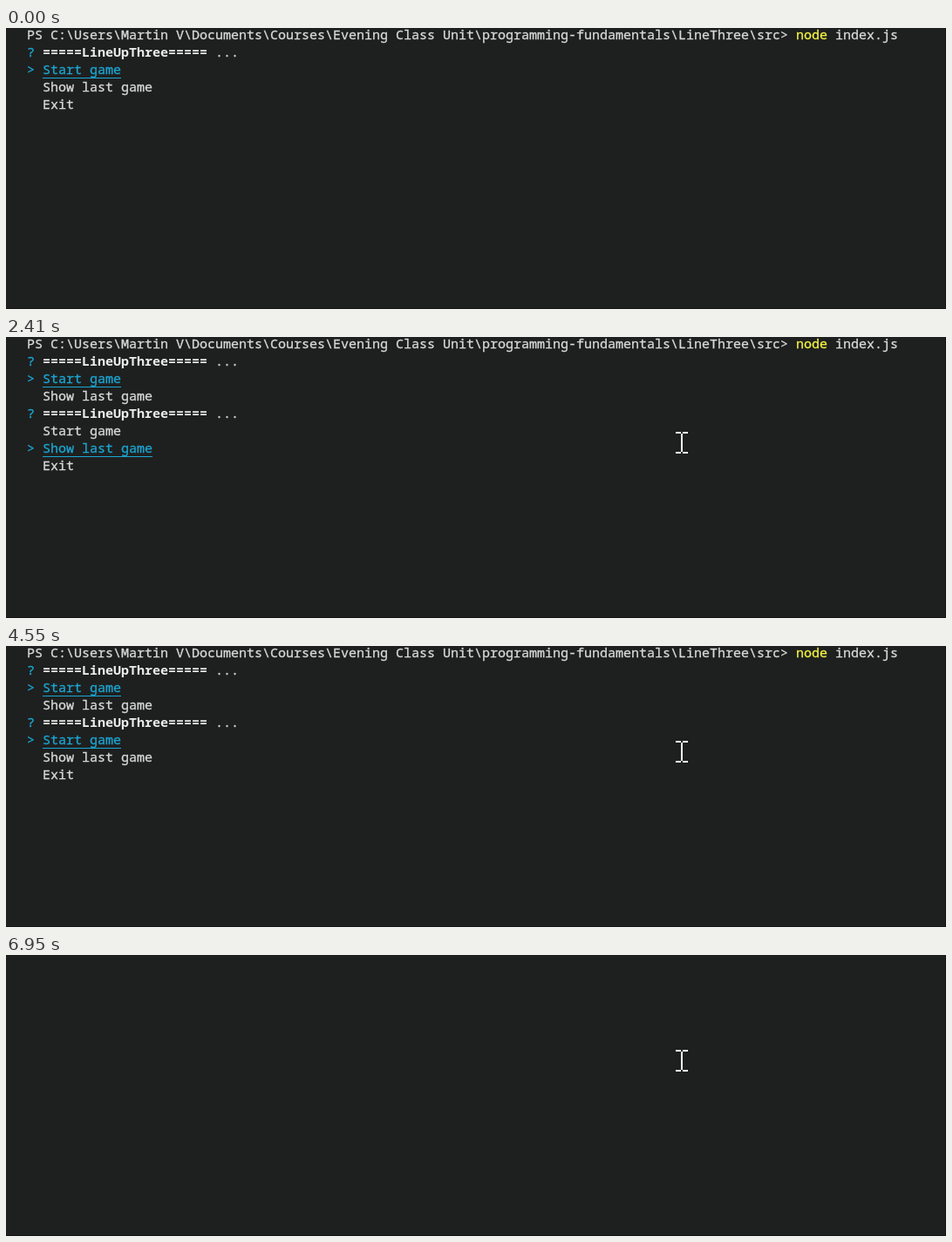
An HTML page for the animation above (8000 ms loop, 1078 by 323 pixels).

```html
<!DOCTYPE html>
<html lang="en">
<head>
<meta charset="utf-8">
<style>
html, body { margin: 0; width: 100%; height: 100%; overflow: hidden; background: #1e201f; }
#frame { position: absolute; inset: 0; border: solid #131413; border-width: 0 1px 1px 0; }
pre {
  position: absolute; left: 24px; top: -3px; margin: 0; color: #dadada;
  font: 15px/20px "Noto Sans Mono", "DejaVu Sans Mono", monospace;
  -webkit-text-stroke: .3px;
}
b { color: #ececec; -webkit-text-stroke: 0; }
i { font-style: normal; color: #f5f543; }
s, u { text-decoration: none; color: #1ca6d4; }
u { box-shadow: 0 1px #1ca6d4; }
svg { position: absolute; left: 0; top: 0; }
</style>
</head>
<body>
<div id="frame"></div>
<pre id="screen"></pre>
<svg width="1078" height="323">
  <circle id="click" cx="772" cy="120" r="18" fill="#ff0" fill-opacity=".47"/>
  <path id="beam" fill="#f4f4f4" d="M-7-12h6v2h-6zM1-12h6v2h-6zM-1-10h2v21h-2zM-7 11h6v2h-6zM1 11h6v2h-6z"/>
</svg>
<script>
const LOOP = 8000, STEP = 68.4;
const PROMPT = "PS C:\\Users\\Martin V\\Documents\\Courses\\Evening Class Unit" +
  "\\programming-fundamentals\\LineThree\\src&gt; <i>node</i> index.js";
const TITLE = "<s>?</s> <b>=====LineUpThree=====</b> ...";
const OPTIONS = ["Start game", "Show last game", "Exit"];

// [time, selected option of the lower menu]; -1 leaves the lower menu blank
const SELECTIONS = [
  [2410, 1], [3220, -1], [3290, 0], [3820, -1], [3890, 1], [4550, 0],
  [4960, 1], [5230, 2], [5690, 1], [6020, -1], [6090, 0]
];

const $ = id => document.getElementById(id);
const screen = $("screen"), beam = $("beam"), click = $("click");

const menu = selected => [TITLE, ...OPTIONS.map((name, i) =>
  i === selected ? `<s>&gt;</s> <u>${name}</u>` : `  ${name}`)];

function terminal(t) {
  if (t >= 6950) return "";
  let lines = [PROMPT, ...menu(0)];
  const current = SELECTIONS.filter(([start]) => t >= start).pop();
  if (current) {
    lines.pop();
    if (current[1] >= 0) lines = lines.concat(menu(current[1]));
  }
  return lines.join("\n");
}

// The pointer sweeps up and out, then comes back to rest.
function pointer(t) {
  if (t >= 740) {
    const left = 1 - Math.min(8, Math.floor((t - 740) / STEP + 0.05)) / 8;
    return [775 + 97 * left ** 1.5, 121 - 121 * left ** 1.5];
  }
  if (t >= 130 && t < 540) {
    const k = Math.floor((t - 130) / STEP + 0.05);
    return [962 - 94 * k / 5, 280 * (1 - k / 6) ** 1.3 - 14];
  }
  return null;
}

let shown = null;
function draw() {
  const t = performance.now() % LOOP;
  const text = terminal(t);
  if (text !== shown) screen.innerHTML = shown = text;
  const at = pointer(t);
  beam.style.display = at ? "" : "none";
  if (at) beam.setAttribute("transform", `translate(${at.map(Math.round)})`);
  click.style.display = t >= 1550 && t < 1620 ? "" : "none";
  requestAnimationFrame(draw);
}
draw();
</script>
</body>
</html>
```
